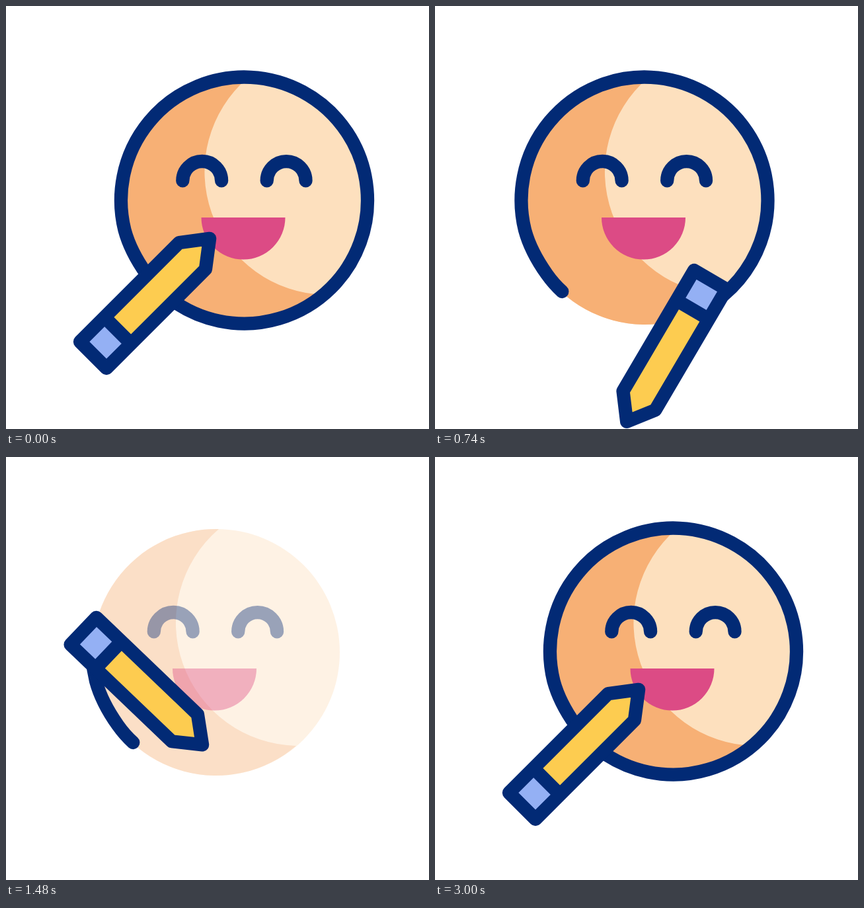
An HTML page for the animation above (3020 ms loop, 640 by 640 pixels).

```html
<!DOCTYPE html>
<html lang="en">
<head>
<meta charset="utf-8">
<title>Pencil and smiley</title>
<style>
  html, body { margin: 0; width: 100%; height: 100%; overflow: hidden; background: #fff; }
  svg { display: block; width: 100%; height: 100%; }
  .line { fill: none; stroke: #022a75; stroke-width: 20.3; stroke-linecap: round; stroke-linejoin: round; }
  .fade { opacity: var(--fade, 1); }
</style>
</head>
<body>
<svg viewBox="0 0 640 640">
  <g id="face">
    <g class="fade">
      <circle cx="318.5" cy="295.5" r="186.5" fill="#fde0be"/>
      <path fill="#f7b075" d="M322 109A186.5 186.5 0 1 0 439 437A186.5 186.5 0 0 1 322 109Z"/>
    </g>
    <path class="fade" fill="#dc4b85" d="M252 320H379A63.5 63.5 0 0 1 252 320Z"/>
    <path class="line fade" d="M223.8 264.4a29.4 29.4 0 0 1 58.8 0M351.2 264.4a29.4 29.4 0 0 1 58.8 0"/>
    <path id="ring" class="line" pathLength="360" stroke-dasharray="360 400"
      d="M204.8 443A186.5 186.5 0 1 0 136 339C143 365 158 390 169 405.5C175 414 184 424.5 192.3 432"/>
  </g>
  <g id="pencil">
    <path fill="#fdcc50" d="M-139-28.3H73L110 0L73 28.3H-139Z"/>
    <path fill="#94b0f4" d="M-139-28.3H-86.5V28.3H-139Z"/>
    <path class="line" d="M-139-28.3H73L110 0L73 28.3H-139ZM-86.5-28.3V28.3"/>
  </g>
</svg>
<script>
  const LOOP = 3020;
  const ERASE = 460, ERASED = 1760, RETURN = 2200, SHOWN = 2600;
  const CENTER = [317, 294], RING_START = 127, ERASER = 113;
  const [face, ring, pencil] = ['face', 'ring', 'pencil'].map(id => document.getElementById(id));

  // Eraser's trip round the ring: time, angle on the ring, radius, direction of the tip
  const orbit = [
    [ERASE, 121.3, 181.8, 135],
    [620, 92, 165, 134],
    [1040, -31.1, 177.9, 81.8],
    [1480, -175.7, 181.5, 43.8],
    [1800, -234.4, 190.6, 30]
  ];

  const progress = (t, from, to) => Math.min(1, Math.max(0, (t - from) / (to - from)));
  const inOut = p => p < 0.5 ? 2 * p * p : 1 - 2 * (1 - p) ** 2;
  const mix = (a, b, p) => a.map((v, i) => v + (b[i] - v) * p);
  const polar = (deg, r) => [r * Math.cos(deg * Math.PI / 180), r * Math.sin(deg * Math.PI / 180)];
  const add = (a, b) => a.map((v, i) => v + b[i]);

  // Smooth curve through the key points, at rest at both ends
  function along(keys, t) {
    const slope = (i, k) => keys[i - 1] && keys[i + 1]
      ? (keys[i + 1][k] - keys[i - 1][k]) / (keys[i + 1][0] - keys[i - 1][0]) : 0;
    let i = 0;
    while (i < keys.length - 2 && t >= keys[i + 1][0]) i++;
    const a = keys[i], b = keys[i + 1];
    const p = progress(t, a[0], b[0]), q = 1 - p;
    return [1, 2, 3].map(k =>
      a[k] * q * q * (1 + 2 * p) + b[k] * p * p * (1 + 2 * q) +
      (b[0] - a[0]) * p * q * (slope(i, k) * q - slope(i + 1, k) * p));
  }

  // Pencil position on the orbit, with the tip direction as third value
  function orbitPose(t) {
    const [angle, r, deg] = along(orbit, t);
    return [...add(CENTER, add(polar(angle, r), polar(deg, ERASER))), deg];
  }

  const home = [230.3, 429.7], bend = [300, 419];
  const first = orbitPose(ERASE), last = orbitPose(RETURN);

  function pencilPose(t) {
    if (t < ERASE) return mix([...home, 315], first, inOut(progress(t, 0, 440)));
    if (t < RETURN) return orbitPose(t);
    const s = Math.sin(progress(t, 2250, 3000) * Math.PI / 2);
    const place = mix(mix(last.slice(0, 2), bend, s), mix(bend, home, s), s);
    const turn = inOut(progress(t, RETURN, 2590));
    return [...place, last[2] + (-45 - last[2]) * turn];
  }

  function draw(t) {
    const back = t >= RETURN;
    const [x, y, deg] = pencilPose(t);
    pencil.setAttribute('transform', `translate(${x} ${y}) rotate(${deg})`);

    const shown = progress(t, RETURN, SHOWN);
    const right = back ? inOut(shown) : 1 - inOut(progress(t, 0, 400));
    face.setAttribute('transform', `translate(${43.5 * right} 0)`);
    face.style.setProperty('--fade', back ? shown : 1 - progress(t, 1000, 1800));

    const erasing = t >= ERASE && t < ERASED;
    ring.style.strokeDashoffset = erasing ? along(orbit, t)[0] - RING_START : 0;
    ring.style.opacity = back ? shown : t < ERASED ? 1 : 0;
  }

  const start = performance.now();
  function tick() {
    draw((performance.now() - start) % LOOP);
    requestAnimationFrame(tick);
  }
  tick();
</script>
</body>
</html>
```
